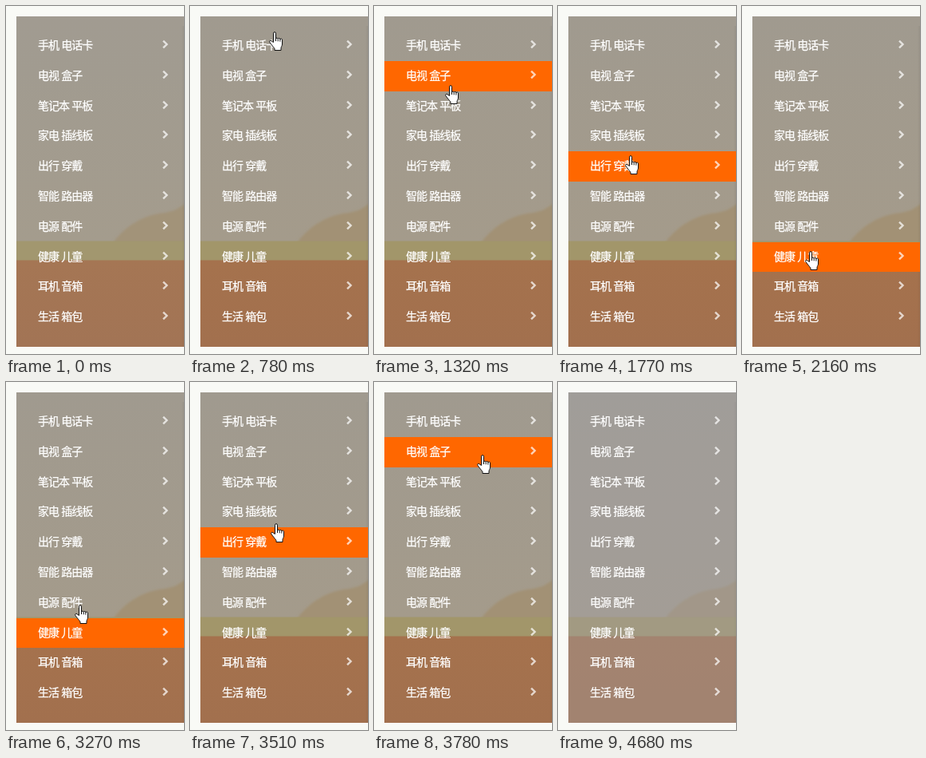
Write an HTML page that moves like this. It is 223 px wide and 436 px high and loops after 4.71 s.

```html
<!DOCTYPE html>
<html lang="zh-CN">
<head>
<meta charset="utf-8">
<style>
html, body { margin: 0; width: 100%; height: 100%; overflow: hidden; background: #f9faf6; }
#stage { position: relative; width: 223px; height: 436px; overflow: hidden; }
#scene, #hand { position: absolute; left: 0; top: 0; }
#hand { left: -1px; }
.row {
  position: absolute; left: 13px; width: 210px;
  box-sizing: border-box; padding-left: 27px;
  font: 14px/34px "Noto Sans CJK SC", "Noto Sans CJK", sans-serif;
  letter-spacing: -1px; word-spacing: 1px; -webkit-text-stroke: .25px #fff;
  color: #fff; white-space: pre;
}
.row.on { background: #ff6700; }
.row svg { position: absolute; left: 182px; top: 11px; }
</style>
</head>
<body>
<div id="stage">
  <svg id="scene" width="223" height="436">
    <defs>
      <linearGradient id="sky" x2="0" y2="1">
        <stop stop-color="#a09a8f"/><stop offset="1" stop-color="#a49b8b"/>
      </linearGradient>
      <linearGradient id="ground" x2="0" y2="1">
        <stop stop-color="#a5724d"/><stop offset="1" stop-color="#a2704e"/>
      </linearGradient>
      <linearGradient id="edge">
        <stop stop-color="#000" stop-opacity="0"/><stop offset="1" stop-color="#000" stop-opacity=".06"/>
      </linearGradient>
      <filter id="soft"><feGaussianBlur stdDeviation="1.5"/></filter>
    </defs>
    <rect x="13" y="13" width="210" height="282" fill="url(#sky)"/>
    <path d="M134 297C146 280 165 265 192 260Q208 258 215 254L227 246V297Z" fill="#a29174" filter="url(#soft)"/>
    <rect x="13" y="318" width="210" height="109" fill="url(#ground)"/>
    <rect x="13" y="294.5" width="210" height="24" fill="#a2966a"/>
    <rect x="220" y="25" width="3" height="402" fill="url(#edge)"/>
    <rect id="veil" x="13" y="13" width="210" height="414" fill="#a0a0a8" opacity="0"/>
  </svg>
  <svg id="hand" width="18" height="25" fill="#fff" stroke="#111" stroke-linejoin="round">
    <path d="M5.5 13.5V2.2a1.5 1.5 0 0 1 3 0V9a1.4 1.4 0 0 1 2.7.3a1.4 1.4 0 0 1 2.7.7a1.3 1.3 0 0 1 2.6.9V16c0 2-1.5 3-1.5 5v2.5H7V21.5C5.5 19 2 15.5.8 13.2c-.7-1.6 1.1-2.6 2.3-1.3z"/>
    <path d="M8.5 8.5V12M11.2 9.3V12.3M13.9 10V12.6" fill="none"/>
  </svg>
</div>
<script>
const LOOP = 4710, STEP = 30, TOP = 31, PITCH = 37.8, LAG = 36;
const labels = ["手机 电话卡", "电视 盒子", "笔记本 平板", "家电 插线板", "出行 穿戴",
  "智能 路由器", "电源 配件", "健康 儿童", "耳机 音箱", "生活 箱包"];
// Pointer path: time, x, y
const path = [
  [300, 212, 17], [810, 98, 33], [1320, 90, 99], [1890, 84, 216], [2160, 80, 307],
  [2430, 78, 376], [2640, 79, 391], [2790, 79, 391], [2820, 79, 389], [3270, 87, 279],
  [3330, 90, 253], [3690, 118, 112], [3780, 130, 91], [3870, 142, 66], [4230, 224, 30]
];
const stage = document.getElementById("stage");
const hand = document.getElementById("hand");
const veil = document.getElementById("veil");

const rowTop = i => Math.round(TOP + PITCH * i);

const rows = labels.map((text, i) => {
  const row = document.createElement("div");
  row.className = "row";
  row.style.top = rowTop(i) + "px";
  row.style.height = rowTop(i + 1) - rowTop(i) + "px";
  row.textContent = text;
  row.insertAdjacentHTML("beforeend",
    '<svg width="9" height="12"><path d="M2 1.6L6.5 6L2 10.4" fill="none" stroke="#fff" stroke-opacity=".72" stroke-width="2.4"/></svg>');
  stage.insertBefore(row, hand);
  return row;
});

const clamp = (v, lo, hi) => Math.max(lo, Math.min(hi, v));
const rate = (i, k) => (path[i + 1][k] - path[i][k]) / (path[i + 1][0] - path[i][0]);

// Harmonic mean keeps the curve from overshooting its points
function slope(i, k) {
  if (i === 0) return rate(0, k);
  if (i === path.length - 1) return rate(i - 1, k);
  const a = rate(i - 1, k), b = rate(i, k);
  return a * b > 0 ? 2 * a * b / (a + b) : 0;
}

function pointer(t, k) {
  t = clamp(t, path[0][0], path[path.length - 1][0]);
  let i = 0;
  while (i < path.length - 2 && t >= path[i + 1][0]) i++;
  const span = path[i + 1][0] - path[i][0], u = (t - path[i][0]) / span, v = 1 - u;
  return path[i][k] * (1 + 2 * u) * v * v + path[i + 1][k] * u * u * (3 - 2 * u)
    + span * u * v * (slope(i, k) * v - slope(i + 1, k) * u);
}

function draw(now) {
  const t = Math.floor((now % LOOP) / STEP) * STEP;
  const shown = t >= 300 && t < 4230;
  hand.style.visibility = shown ? "visible" : "hidden";
  hand.style.transform = `translate(${Math.round(pointer(t, 1))}px, ${Math.round(pointer(t, 2))}px)`;

  const over = t >= 840 && t < 4230
    ? clamp(Math.floor((pointer(t - LAG, 2) + 6 - TOP) / PITCH), 0, 9) : -1;
  rows.forEach((row, i) => row.classList.toggle("on", i === over));

  // The scene greys out at the end and clears just after the loop restarts
  const fadeOut = 0.38 * clamp((t - 4470) / 210, 0, 1);
  const fadeIn = 0.08 * clamp(1 - t / 150, 0, 1);
  veil.setAttribute("opacity", Math.max(fadeOut, fadeIn));
}

const start = performance.now();
function tick() {
  draw(performance.now() - start);
  requestAnimationFrame(tick);
}
tick();
</script>
</body>
</html>
```
